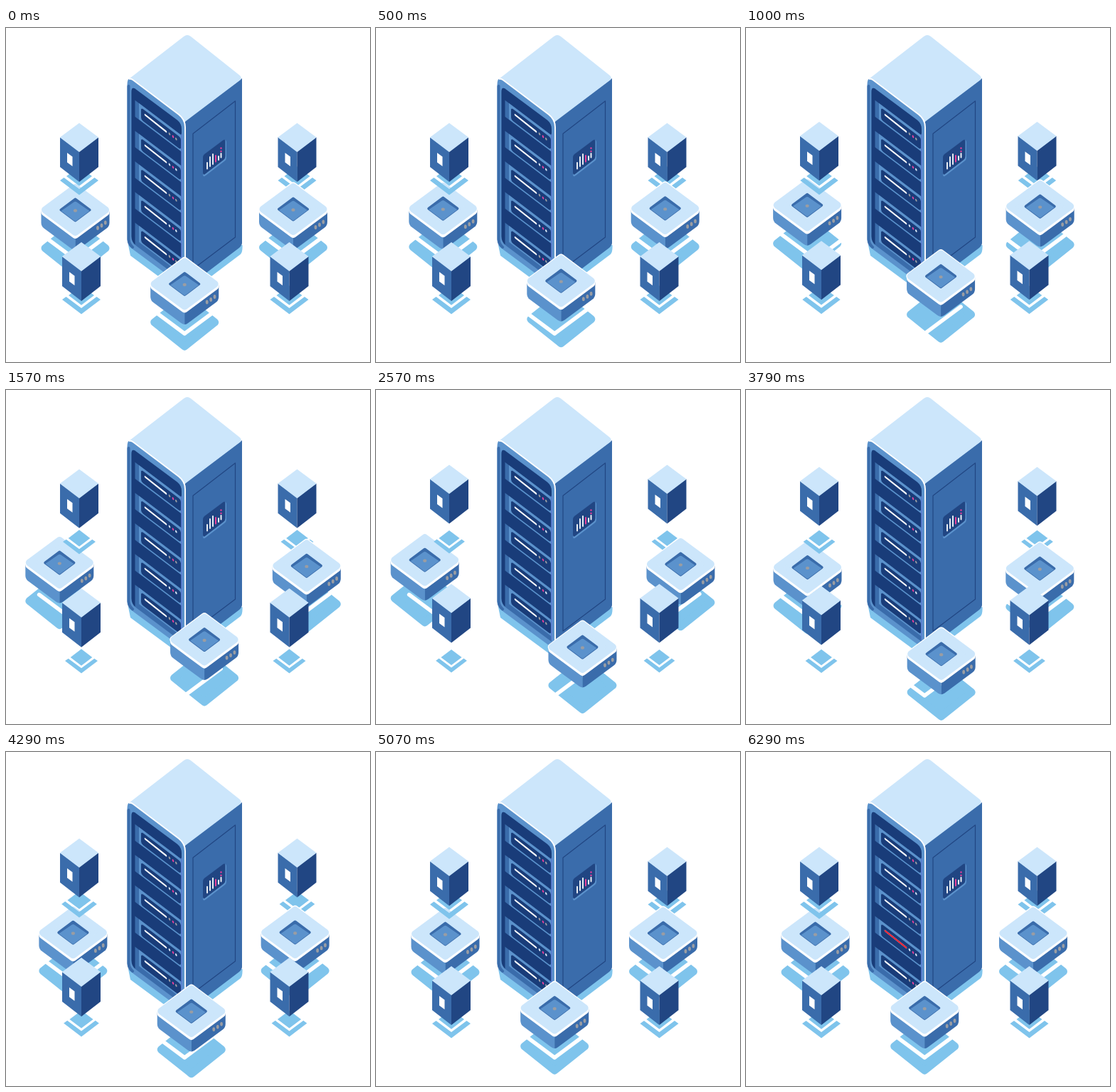
Animation, 512 px wide and 471 px high, one loop 7210 ms. Source, as an HTML page:

```html
<!DOCTYPE html>
<html lang="en">
<head>
<meta charset="utf-8">
<title>Server network</title>
<style>
html, body { margin: 0; width: 100%; height: 100%; overflow: hidden; background: #fff; }
svg { display: block; width: 100vw; height: 100vh; }
</style>
</head>
<body>
<svg id="stage" viewBox="0 0 512 471"></svg>
<script>
const LOOP = 7210;
const C = {
  pale: '#cce6fb', sky: '#7fc4ec', light: '#5b92cc', mid: '#3a6cab',
  dark: '#214683', navy: '#193c79', pink: '#e8409c', grey: '#9a9da3'
};
const stage = document.getElementById('stage');

const path = (d, fill, extra = '') => `<path d="${d}" fill="${fill}" ${extra}/>`;
const line = (d, color, width, extra = '') =>
  path(d, 'none', `stroke="${color}" stroke-width="${width}" stroke-linecap="round" stroke-linejoin="round" ${extra}`);
const dot = (x, y, rx, ry, fill) => `<ellipse cx="${x}" cy="${y}" rx="${rx}" ry="${ry}" fill="${fill}"/>`;

// Rhombus with half axes w and h, its corners rounded by r.
const rhombus = (y, w, h, fill, r = 0) =>
  path(`M0 ${y - h}L${w} ${y}L0 ${y + h}L${-w} ${y}Z`, fill,
    r ? `stroke="${fill}" stroke-width="${2 * r}" stroke-linejoin="round"` : '');

function drawer(i) {
  const lamps = [[43, C.grey, '#d7e6f5'], [48, C.pink, C.pink], [52.3, C.grey, '#d7e6f5']];
  return `<g transform="matrix(1 .76 0 1 187 ${106 + 43.2 * i})">
    <rect x="-6" y="-20" width="66" height="20" fill="${C.navy}"/>
    <rect width="60" height="23" fill="${C.light}"/>
    <rect x="3" y="4" width="56" height="17" rx="3" fill="${C.navy}"/>
    ${line('M9 10L38 11', '#fff', 2.6)}
    ${i === 3 ? line('M9 10L38 11', '#ee1c2e', 2.5, 'id="alarm"') : ''}
    ${lamps.map(([x, a, b]) => dot(x, 10.7, 1.3, 1.7, i % 2 ? b : a)).join('')}
  </g>`;
}

function server() {
  const panel = 'M176.5 90Q176.5 82 182 86L241 130Q247 135 247 143V355L183 307Q176.5 302 176.5 294Z';
  const face = 'M170.5 80Q170.5 68 178 73L243 122Q252.5 129 252.5 140V367L177 311Q170.5 306 170.5 298Z';
  const bars = [[283, 190, 198.5], [287, 182, 195], [291, 178, 192], [299, 181, 186], [302.5, 177, 182.5]];
  return path('M172 306L175 321L252 378L330 319Q333 316 332.5 306Z', C.sky) +
    path('M252 131L332 71V302Q332.5 306 328 310L252 368Z', C.mid) +
    path('M174 71L250 12Q255 8 260 12L329 67Q332 70 330 73L252 132Z', C.pale) +
    path(face, C.light) +
    line('M172.5 82V298Q173 305 178 309', C.mid, 4) +
    `<clipPath id="panel"><path d="${panel}"/></clipPath>` +
    path(panel, C.mid) +
    `<g clip-path="url(#panel)">${[0, 1, 2, 3, 4].map(drawer).join('')}
      ${path('M176 80H181.5V310H176Z', C.navy)}</g>` +
    line('M247 150V352', '#5c7ed3', 1.6) +
    line('M174 72Q176 71 179 73.5L243 122Q252 129 252 140V362', '#fff', 1.9) +
    line('M263 149L322.5 103V295L263 340Z', C.dark, 1.2) +
    path('M280 180L307 159Q310 157 310 161V183Q310 186 307 188L281 208Q277 211 277 206Z', C.light) +
    path('M279 178L305 158.500Q308.500 156 308.500 160V181Q308.500 184 306 186L280 206Q277 208 277 204V182Q277 180 279 178Z', C.dark) +
    bars.map(([x, a, b]) => line(`M${x} ${a}V${b}`, '#fff', 1.8)).join('') +
    line('M295 180V188.500', C.pink, 2) +
    dot(302.5, 169.5, 1.2, 1.2, C.pink) + dot(302.5, 174, 1.2, 1.2, C.pink);
}

// The white V stays on the floor while the router and its shadow glide.
function router(id, x, y) {
  const side = (s, fill) =>
    path(`M0 38H${48 * s}V55Q${48 * s} 60 ${44 * s} 63L${5 * s} 92Q${2 * s} 94 0 94Z`, fill);
  const body = side(-1, C.light) + side(1, C.mid) +
    rhombus(40.5, 43, 32, '#fff', 5) + rhombus(37, 43.3, 32.5, '#fff', 5.500) +
    rhombus(37, 42.5, 31.500, C.pale, 5) +
    rhombus(37, 20, 15, C.mid, 2) +
    path('M-20 38.500L-2 26Q0 24.500 2 26L20 38.500L2 52Q0 54 -2 52Z', C.light) +
    dot(0, 38, 2.6, 2.2, C.grey) +
    [[31.5, 62.5], [37, 59], [42.3, 55]].map(([a, b]) => dot(a, b, 1.9, 2.9, C.grey)).join('');
  return `<g transform="translate(${x} ${y})">
    <g class="${id}">${rhombus(91, 42.5, 34, C.sky, 5.5)}</g>
    ${line('M-51 69L0 107L51 69', '#fff', 5.4)}
    <g class="${id}">${body}</g></g>`;
}

function cube(x, y) {
  return `<g transform="translate(${x} ${y})">
    <g class="glow">${rhombus(0, 18, 13.7, C.sky)}
      ${path('M-27 6L0 26.500L27 6L21.500 2L0 18L-21.500 2Z', C.sky)}</g>
    <g class="cube">
      ${path('M-27 20L0 40V83L-27 62Z', C.mid)}
      ${path('M27 20L0 40V83L27 62Z', C.dark)}
      ${path('M0 0L27.200 20.300L0 41L-27.200 20.300Z', C.pale)}
      ${path('M-17 42L-9.500 47.500V61L-17 55.500Z', '#fff')}
    </g></g>`;
}

stage.innerHTML = server() +
  router('left', 97.5, 219.5) + cube(103, 134) + cube(106, 302) +
  cube(409.5, 134) + router('right', 404, 218.5) + cube(398.5, 302) +
  router('front', 251.2, 324);

const all = name => [...stage.querySelectorAll('.' + name)];
const parts = Object.fromEntries(['left', 'right', 'front', 'cube', 'glow'].map(n => [n, all(n)]));
const alarm = document.getElementById('alarm');
const place = (name, value) => parts[name].forEach(el => el.setAttribute('transform', value));
const shift = (name, x, y) => place(name, `translate(${x} ${y})`);

const ramp = (t, a, b) => Math.min(1, Math.max(0, (t - a) / (b - a)));
const ease = (t, a, b) => (1 - Math.cos(Math.PI * ramp(t, a, b))) / 2;

const ROUTE = [[0, 0], [24.5, -11.7], [40, 1], [25, 12], [0, 0]];
const LEG = 1200;

function render(t) {
  const slide = ease(t, 0, 2330) - ease(t, 2400, 4800);
  shift('left', -29.2 * slide, -17 * slide);
  shift('right', 24.8 * slide, -10 * slide);

  const leg = Math.min(3, Math.floor(t / LEG));
  const k = ease(t, leg * LEG, (leg + 1) * LEG);
  const [x, y] = ROUTE[leg].map((v, i) => v + (ROUTE[leg + 1][i] - v) * k);
  shift('front', x, y);

  const lift = ease(t, 830, 1900) - ease(t, 3480, 4950);
  shift('cube', 0, -28.5 * lift);
  place('glow', `translate(0 75) scale(${1 - 0.19 * lift})`);

  alarm.setAttribute('opacity', ramp(t, 5570, 6290));
}

const start = performance.now();
function tick() {
  render((performance.now() - start) % LOOP);
  requestAnimationFrame(tick);
}
tick();
</script>
</body>
</html>
```
